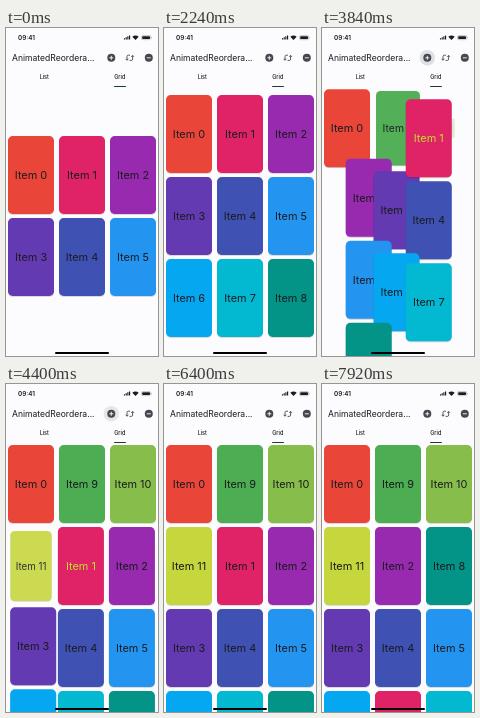
Recreate the animation shown at these times as an HTML page. Size 152 by 328 pixels, loop 8 s.

```html
<!DOCTYPE html>
<html lang="en">
<head>
<meta charset="utf-8">
<title>Animated grid</title>
<style>
html, body { margin: 0; width: 100%; height: 100%; overflow: hidden; background: #fcfcff; }
svg { display: block; width: 152px; height: 328px; font-family: Inter, Roboto, sans-serif; fill: #1b1b1f; }
.tile text { font-size: 10.9px; text-anchor: middle; }
</style>
</head>
<body>
<svg viewBox="0 0 152 328">
  <rect width="152" height="328" fill="#fcfcff"/>
  <g id="grid"></g>
  <text x="12" y="12" font-size="6.3" font-weight="600">09:41</text>
  <g id="status">
    <path d="M118.500 11.500v-1.300M120.200 11.500v-2.200M121.900 11.500v-3.200M123.600 11.500v-4" stroke="#111" stroke-width="1.100"/>
    <path d="M126.300 8.800q3.200-2.800 6.400 0L129.500 12z"/>
    <rect x="135.500" y="7.500" width="9.200" height="4.200" rx="1.300" fill="none" stroke="#999" stroke-width=".5"/>
    <rect x="136.200" y="8.200" width="7.800" height="2.800" rx=".7"/>
    <path d="M145.500 9v1.300" stroke="#999" stroke-width=".6"/>
  </g>
  <text x="6" y="33" font-size="8.57">AnimatedReordera...</text>
  <circle id="ring" cx="105.300" cy="29.800" r="7.700" fill="#dfe0e5"/>
  <g fill="#44474e">
    <circle cx="105.300" cy="29.800" r="4"/>
    <circle cx="142.800" cy="29.800" r="4"/>
  </g>
  <path d="M103.300 29.800h4M105.300 27.800v4M140.800 29.800h4" stroke="#fcfcff" stroke-width=".9"/>
  <path d="M121 32v-3.500q0-1.300 1.300-1.300h1.700M126.600 27.800v3.300q0 1.300-1.300 1.300h-1.700M119.700 30.800l1.300 1.500 1.300-1.500M125.300 28.800l1.300-1.500 1.300 1.500" fill="none" stroke="#44474e" stroke-width=".9"/>
  <g font-size="5.5" font-weight="500" text-anchor="middle">
    <text x="38.300" y="51">List</text>
    <text x="113.800" y="51">Grid</text>
  </g>
  <rect x="108" y="58" width="12" height="1" rx=".4" fill="#1c3540"/>
  <rect x="49" y="324" width="54" height="2" rx="1" fill="#000"/>
</svg>
<script>
const LOOP = 8000, DUR = 250, W = 46, H = 78, COL = 51, ROW = 82;
const colors = ['#e94639', '#e02267', '#972aae', '#643ab2', '#3f51b3', '#2494f1',
  '#06a7f1', '#03b8d1', '#039487', '#4cad52', '#87be4b', '#c6d63d'];

const inserts = [
  { at: 1310, id: 6, index: 6 }, { at: 1560, id: 7, index: 7 }, { at: 1820, id: 8, index: 8 },
  { at: 3602, id: 9, index: 1 }, { at: 3780, id: 10, index: 2 }, { at: 4177, id: 11, index: 3 }
];
const swaps = [{ at: 6850, a: 1, b: 2 }, { at: 7130, a: 1, b: 8 }, { at: 7410, a: 1, b: 7 }];
const born = Object.fromEntries(inserts.map(e => [e.id, e.at]));

// Every layout the grid passes through, with the time it starts.
const layouts = [{ at: -DUR, order: [0, 1, 2, 3, 4, 5] }];
for (const e of [...inserts, ...swaps]) {
  const order = layouts.at(-1).order.slice();
  if ('id' in e) order.splice(e.index, 0, e.id);
  else {
    const i = order.indexOf(e.a), j = order.indexOf(e.b);
    [order[i], order[j]] = [order[j], order[i]];
  }
  layouts.push({ at: e.at, order });
}

const clamp = v => Math.min(1, Math.max(0, v));
const since = (t, at) => clamp((t - at) / DUR);

// cubic-bezier(.42, 0, .58, 1)
function ease(x) {
  let lo = 0, hi = 1, u = .5;
  for (let k = 0; k < 18; k++) {
    u = (lo + hi) / 2;
    if (1.26 * u * (1 - u) ** 2 + 1.74 * u * u * (1 - u) + u ** 3 < x) lo = u; else hi = u;
  }
  return u * u * (3 - 2 * u);
}

const slot = i => [2 + COL * (i % 3), ROW * Math.floor(i / 3)];

// Each new target starts from wherever the tile is at that moment.
function place(id, t) {
  let target = null, from = null, start = 0;
  const at = time => {
    const k = ease(since(time, start));
    return from.map((v, i) => v + (target[i] - v) * k);
  };
  for (const l of layouts) {
    if (l.at > t) break;
    const i = l.order.indexOf(id);
    if (i < 0) continue;
    const next = slot(i);
    if (target && next[0] === target[0] && next[1] === target[1]) continue;
    from = target ? at(l.at) : next;
    target = next;
    start = l.at;
  }
  return target && at(t);
}

const grid = document.getElementById('grid');
const ring = document.getElementById('ring');
const NS = 'http://www.w3.org/2000/svg';

function add(parent, tag, attrs) {
  const el = document.createElementNS(NS, tag);
  for (const k in attrs) el.setAttribute(k, attrs[k]);
  return parent.appendChild(el);
}

const tiles = [];
for (const id of [9, 10, 11, 0, 2, 3, 4, 5, 6, 7, 8, 1]) {
  const g = add(grid, 'g', { class: 'tile' });
  add(g, 'rect', { x: -W / 2, y: -H / 2 + .8, width: W, height: H, rx: 4.7, fill: '#000', opacity: .18 });
  add(g, 'rect', { x: -W / 2, y: -H / 2, width: W, height: H, rx: 4.7, fill: colors[id] });
  const label = add(g, 'text', { y: 3.9 });
  label.textContent = 'Item ' + id;
  tiles.push({ id, g, label });
}

const pulse = (t, a, b) => clamp((t - a) / 60) * clamp((b - t) / 300);

function draw(t) {
  const top = 108 - 41 * since(t, born[6]) ** 1.2 - 6 * since(t, born[9]);
  for (const { id, g, label } of tiles) {
    const pos = place(id, t);
    const s = id in born ? since(t, born[id]) : 1;
    g.style.display = pos && s > 0 ? '' : 'none';
    if (!pos) continue;
    // The first tile of a new row grows downwards together with the row.
    const lift = id === 6 ? (1 - s) * (H / 2 + 8) : 0;
    const x = pos[0] + W / 2, y = top + pos[1] + H / 2 - lift;
    g.setAttribute('transform', `translate(${x.toFixed(2)} ${y.toFixed(2)}) scale(${s.toFixed(3)})`);
    g.setAttribute('opacity', s);
    let ink = '#1b1b1f';
    if (id === 1 && t >= 3760 && t < 4560) ink = '#bce22c';
    if (id === 6 && s < 1) ink = '#a8267e';
    label.setAttribute('fill', ink);
  }
  ring.setAttribute('opacity', Math.max(pulse(t, 1260, 2160), pulse(t, 3540, 4640)));
}

const t0 = performance.now();
function tick() {
  draw((performance.now() - t0) % LOOP);
  requestAnimationFrame(tick);
}
tick();
</script>
</body>
</html>
```
